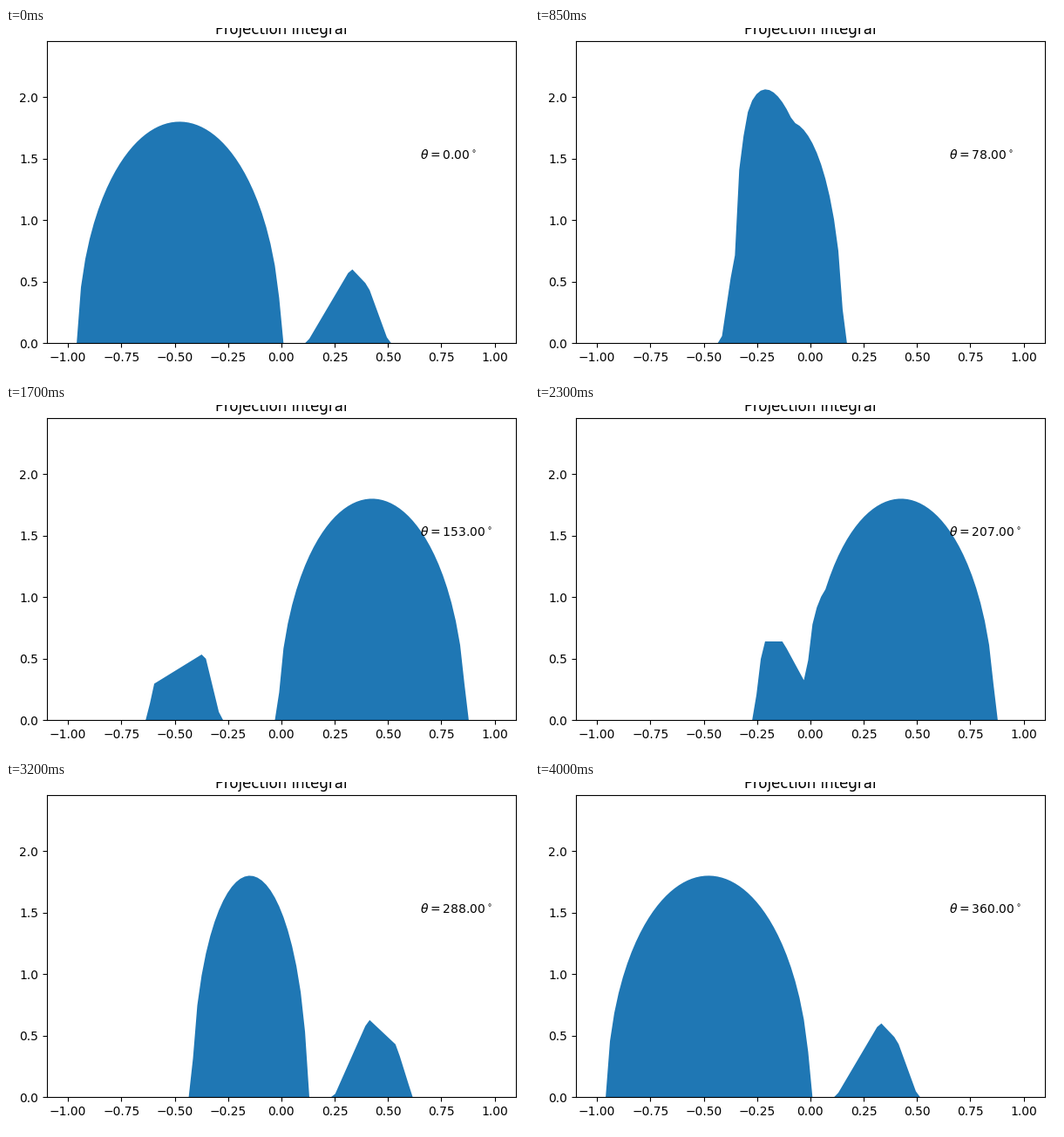
A matplotlib script for the animation above (4050 ms loop, 600x400 px).

```python
import numpy as np
import matplotlib.pyplot as plt
from matplotlib.animation import FuncAnimation

FRAMES, INTERVAL = 81, 50
STEP = 3  # degrees

A, B = 0.4775, 0.23875  # ellipse half-axes, centre at (-A, 0)
PEAK = 1.8
QUAD = np.array([(0.119, -0.391), (0.327, -0.152),
                 (0.505, -0.403), (0.407, -0.515)])

t = np.linspace(-1, 1, 100)


def ellipse_profile(th):
    s = np.hypot(A * np.cos(th), B * np.sin(th))
    u = (t + A * np.cos(th)) / s
    return PEAK * np.sqrt(np.clip(1 - u**2, 0, None))


def quad_profile(th):
    c, s = np.cos(th), np.sin(th)
    u = QUAD @ (c, s)
    v = QUAD @ (-s, c)
    chord = np.zeros_like(t)
    for u0, v0, u1, v1 in zip(u, v, np.roll(u, -1), np.roll(v, -1)):
        if u0 == u1:
            continue
        inside = (t >= min(u0, u1)) & (t < max(u0, u1))
        cut = v0 + (v1 - v0) * (t - u0) / (u1 - u0)
        chord += np.sign(u1 - u0) * np.where(inside, cut, 0)
    density = 1.957 + 0.145 * np.cos(2 * (th - np.radians(66)))
    return density * np.abs(chord)


def outline(deg):
    th = np.radians(deg)
    y = ellipse_profile(th) + quad_profile(th)
    top = np.column_stack([t, y])
    base = np.column_stack([t[::-1], np.zeros_like(t)])
    return np.vstack([(t[0], 0), top, (t[-1], 0), base])


fig, ax = plt.subplots(figsize=(6, 4), dpi=100)
area = ax.fill_between(t, 0 * t, color=None, facecolor="C0")
ax.set_xlim(-1.1, 1.1)
ax.set_ylim(0, 2.455)
fig.tight_layout()
ax.set_title("Projection integral")
label = ax.text(0.65, 1.5, "")


def update(i):
    deg = STEP * int(1.5 * i + 0.5)
    area.set_verts([outline(deg)])
    label.set_text(rf"$\theta={deg:.2f}^\circ$")
    return area, label


anim = FuncAnimation(fig, update, frames=FRAMES, interval=INTERVAL,
                     repeat=True, repeat_delay=0)
plt.show()
```
